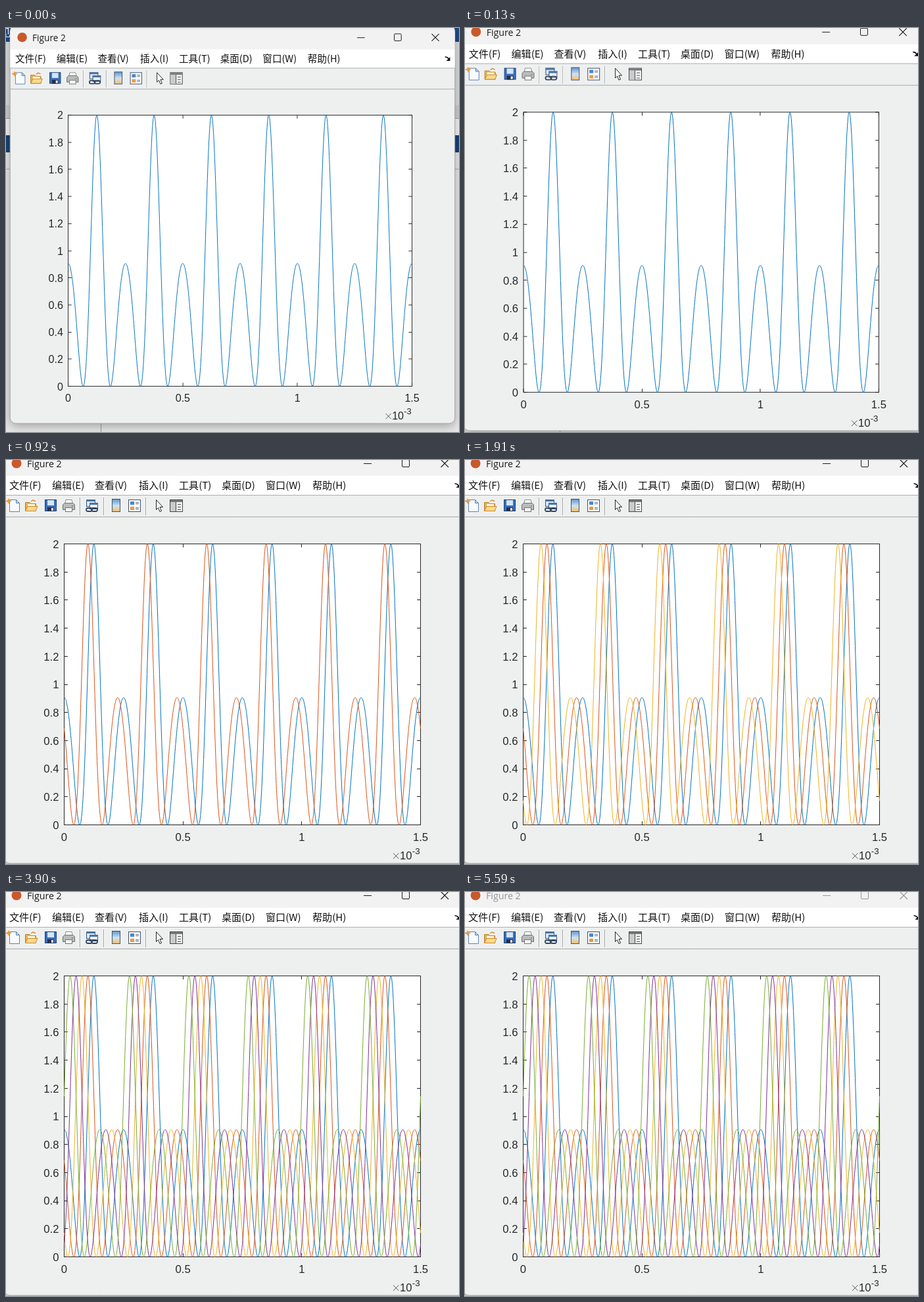
An HTML page with a canvas that plays this animation: 689x614 px, repeating every 5660 ms.

```html
<!DOCTYPE html>
<html lang="zh-CN">
<head>
<meta charset="utf-8">
<title>Figure 2</title>
<style>
html, body { margin: 0; width: 100%; height: 100%; overflow: hidden; background: #e4e4e4; }
canvas { display: block; }
</style>
</head>
<body>
<canvas id="stage" width="689" height="614"></canvas>
<script>
const ctx = document.getElementById('stage').getContext('2d');
const LOOP = 5660, BLUR_AT = 5590;
const UI = '"Open Sans", "Noto Sans", sans-serif';
const CJK = '"Noto Sans CJK SC", "Noto Sans CJK", sans-serif';
const PLOT = '"Liberation Sans", Arial, sans-serif';

// Window pops open in steps: [start, scale]
const ZOOM = [[0, 0.965], [70, 0.99], [130, 0.997], [200, 1]];
const PIVOT = { x: 261, y: 268 };

const AXES = { x: 88.5, y: 127.5, w: 542, h: 427 };
const DEPTH = 4.618, LAG = 0.025;
const SERIES = [[0, '#0072bd'], [920, '#d95319'], [1910, '#edb120'], [2910, '#7e2f8e'], [3900, '#77ac30']];

const MENU = [[5, '文件(F)'], [70, '编辑(E)'], [135, '查看(V)'], [202, '插入(I)'],
  [263, '工具(T)'], [328, '桌面(D)'], [395, '窗口(W)'], [466, '帮助(H)']];

function rect(x, y, w, h, fill, stroke) {
  if (fill) { ctx.fillStyle = fill; ctx.fillRect(x, y, w, h); }
  if (stroke) { ctx.strokeStyle = stroke; ctx.lineWidth = 1; ctx.strokeRect(x, y, w, h); }
}

function line(pts, color, width = 1) {
  ctx.beginPath();
  for (let i = 0; i < pts.length; i += 2) ctx.lineTo(pts[i], pts[i + 1]);
  ctx.strokeStyle = color;
  ctx.lineWidth = width;
  ctx.stroke();
}

function shape(pts, fill, stroke) {
  ctx.beginPath();
  for (let i = 0; i < pts.length; i += 2) ctx.lineTo(pts[i], pts[i + 1]);
  ctx.closePath();
  ctx.fillStyle = fill;
  ctx.fill();
  if (stroke) { ctx.strokeStyle = stroke; ctx.lineWidth = 1; ctx.stroke(); }
}

function disc(x, y, r, fill) {
  ctx.beginPath();
  ctx.arc(x, y, r, 0, Math.PI * 2);
  ctx.fillStyle = fill;
  ctx.fill();
}

function text(str, x, y, size, family, color, align = 'left') {
  ctx.font = size + 'px ' + family;
  ctx.textAlign = align;
  ctx.fillStyle = color;
  ctx.fillText(str, x, y);
}

function drawDesktop() {
  rect(0, 0, 689, 614, '#e8e8e8');
  rect(0, 0, 689, 21, '#1d4a85');
  text('见', -9, 13, 16, CJK, '#fff');
  rect(0, 21, 689, 96, '#dcdee0');
  rect(0, 117, 689, 20, '#cfcfcf');
  rect(0, 137, 689, 1, '#9c9c9c');
  rect(0, 138, 689, 25, '#f6f6f6');
  rect(0, 163, 689, 26, '#17437c');
  rect(0, 214, 689, 1, '#aaa');
  rect(144, 560, 1, 54, '#999');
}

function drawFrame() {
  ctx.beginPath();
  ctx.roundRect(-3, -14, 701, 627, 9);
  ctx.save();
  ctx.shadowColor = 'rgba(0,0,0,.32)';
  ctx.shadowBlur = 16;
  ctx.shadowOffsetY = 4;
  ctx.fillStyle = '#eef0f0';
  ctx.fill();
  ctx.restore();
  ctx.strokeStyle = '#a6a8a8';
  ctx.lineWidth = 1;
  ctx.stroke();
}

function drawTitle(active) {
  const ink = active ? '#1a1a1a' : '#969696';
  rect(-3, -5, 701, 29, '#f3f2f3');
  disc(16, 5, 7.5, '#c9592b');
  text('Figure 2', 32, 11, 14.2, UI, ink);
  line([544, 5.5, 556, 5.5], ink);
  ctx.beginPath();
  ctx.roundRect(602.5, -0.5, 11, 11, 1.5);
  ctx.stroke();
  line([661.5, -0.5, 673, 11], ink, 1.1);
  line([673, -0.5, 661.5, 11], ink, 1.1);
}

function drawMenu() {
  rect(-3, 24, 701, 29, '#fff');
  for (const [x, label] of MENU) text(label, x, 44.3, 15.1, CJK, '#111');
  ctx.beginPath();
  ctx.moveTo(682.5, 36);
  ctx.quadraticCurveTo(686, 35.5, 688.5, 39);
  ctx.strokeStyle = '#111';
  ctx.lineWidth = 1.6;
  ctx.stroke();
  shape([690.5, 36, 690.5, 42, 684.5, 42], '#111');
}

function iconNew() {
  shape([5.5, 60.5, 15.5, 60.5, 20.5, 65.5, 20.5, 78.5, 5.5, 78.5], '#f7fbff', '#5d83ad');
  shape([15.5, 60.5, 20.5, 65.5, 15.5, 65.5], '#c3d9ee', '#5d83ad');
  shape([4, 58, 5.5, 61, 9, 62.5, 5.5, 64, 4, 67, 2.5, 64, -1, 62.5, 2.5, 61], '#f09a36');
}

function iconOpen() {
  shape([29.5, 77.5, 29.5, 64.5, 36, 64.5, 38, 66.5, 45.5, 66.5, 45.5, 77.5], '#e9b04c', '#b9802c');
  rect(33, 67, 11, 5, '#fff8e4');
  shape([29.5, 77.5, 33, 70.5, 48, 70.5, 45, 77.5], '#fbd98c', '#c48a30');
  line([38, 63, 41, 61, 45, 62.5], '#d98a2b', 1.5);
}

function iconSave() {
  rect(59.5, 60.5, 17, 17, '#3b6fb8', '#1f3f76');
  rect(63, 61, 10, 8, '#d3e4f6');
  rect(63, 72, 10, 6, '#23324c');
  rect(69, 73, 3, 4, '#fff');
}

function iconPrint() {
  shape([89.5, 67, 91, 60.5, 100, 60.5, 101.5, 67], '#fff', '#8b8b8b');
  shape([86.5, 68, 89, 65.5, 102, 65.5, 104.5, 68, 104.5, 75.5, 86.5, 75.5], '#b9bbbd', '#6d6f72');
  rect(90.5, 72.5, 10, 6, '#f4f4f4', '#777');
  rect(100, 69, 2, 2, '#6aa84f');
}

function iconLink() {
  rect(122.5, 60.5, 13, 10, '#dce9f6', '#35547d');
  rect(122, 60, 14, 3, '#4a73a6');
  rect(127.5, 65.5, 12, 9, '#eef4fa', '#35547d');
  rect(127, 65, 13, 3, '#4a73a6');
  ctx.lineWidth = 1.8;
  ctx.strokeStyle = '#33465e';
  for (const x of [122, 130]) {
    ctx.beginPath();
    ctx.roundRect(x, 73, 9, 5, 2.5);
    ctx.stroke();
  }
}

function iconColorbar() {
  const g = ctx.createLinearGradient(0, 60, 0, 79);
  g.addColorStop(0, '#5f9bd6');
  g.addColorStop(0.5, '#cfe2ee');
  g.addColorStop(1, '#f6bc68');
  rect(161.5, 59.5, 12, 19, g, '#42526b');
}

function iconLegend() {
  rect(186.5, 60.5, 18, 18, '#f7f9fc', '#42526b');
  rect(189, 63, 6, 5, '#4b86c6');
  rect(189, 71, 6, 5, '#ee9a3c');
  for (const y of [64.5, 66.5, 72.5, 74.5]) line([197, y, 202, y], '#66768c');
}

function iconPointer() {
  shape([228.5, 60.5, 228.5, 75.5, 231.5, 72.5, 234, 78.5, 236.5, 77.5, 234, 71.5, 238.5, 71.5], '#fff', '#222');
}

function iconInspector() {
  rect(249.5, 60.5, 19, 18, '#f4f4f4', '#444');
  rect(250, 61, 18, 3, '#77797c');
  rect(250, 64, 8, 14, '#c9cbcd');
  line([258.5, 64, 258.5, 78], '#444');
  for (const y of [67.5, 71.5, 75.5]) line([261, y, 266, y], '#555');
}

function drawToolbar() {
  line([-3, 53.5, 698, 53.5], '#adafaf');
  line([-3, 86.5, 698, 86.5], '#a6a8a8');
  for (const x of [112.5, 148.5, 212.5]) {
    line([x, 57, x, 84], '#a3a5a5');
    line([x + 1, 57, x + 1, 84], '#fafafa');
  }
  [iconNew, iconOpen, iconSave, iconPrint, iconLink,
    iconColorbar, iconLegend, iconPointer, iconInspector].forEach(draw => draw());
}

function drawAxes() {
  const { x, y, w, h } = AXES, ink = '#262626', size = 16.67, tick = 5.4;
  rect(x, y, w, h, '#fff', ink);
  for (let i = 0; i <= 10; i++) {
    const ty = y + h - h * i / 10;
    const snap = Math.floor(ty) + 0.5;
    line([x, snap, x + tick, snap], ink);
    line([x + w, snap, x + w - tick, snap], ink);
    text(String(i / 5), x - 8, ty + 6.3, size, PLOT, ink, 'right');
  }
  for (let i = 0; i <= 3; i++) {
    const tx = x + w * i / 3;
    const snap = Math.floor(tx) + 0.5;
    line([snap, y, snap, y + tick], ink);
    line([snap, y + h, snap, y + h - tick], ink);
    text(String(i / 2), tx, 579, size, PLOT, ink, 'center');
  }
  line([589, 597.5, 597.5, 606], '#444', 0.9);
  line([597.5, 597.5, 589, 606], '#444', 0.9);
  text('10', 599, 607, size, PLOT, ink);
  text('-3', 617.7, 599, 13.3, PLOT, ink);
}

function drawCurve(shift, color) {
  const pts = [];
  for (let px = 0; px <= AXES.w; px += 0.5) {
    const ms = px / AXES.w * 1.5 + shift;
    const v = 1 + Math.cos(DEPTH * Math.cos(4 * Math.PI * ms));
    pts.push(AXES.x + px, AXES.y + AXES.h * (1 - v / 2));
  }
  ctx.lineJoin = 'round';
  line(pts, color);
  ctx.lineJoin = 'miter';
}

function render(t) {
  const scale = ZOOM.filter(step => t >= step[0]).pop()[1];
  ctx.setTransform(1, 0, 0, 1, 0, 0);
  drawDesktop();
  ctx.setTransform(scale, 0, 0, scale, PIVOT.x * (1 - scale), PIVOT.y * (1 - scale));
  drawFrame();
  drawTitle(t < BLUR_AT);
  drawMenu();
  drawToolbar();
  drawAxes();
  SERIES.forEach(([start, color], i) => {
    if (t >= start) drawCurve(i * LAG, color);
  });
}

const begin = performance.now();
function tick() {
  render((performance.now() - begin) % LOOP);
  requestAnimationFrame(tick);
}
tick();
</script>
</body>
</html>
```
